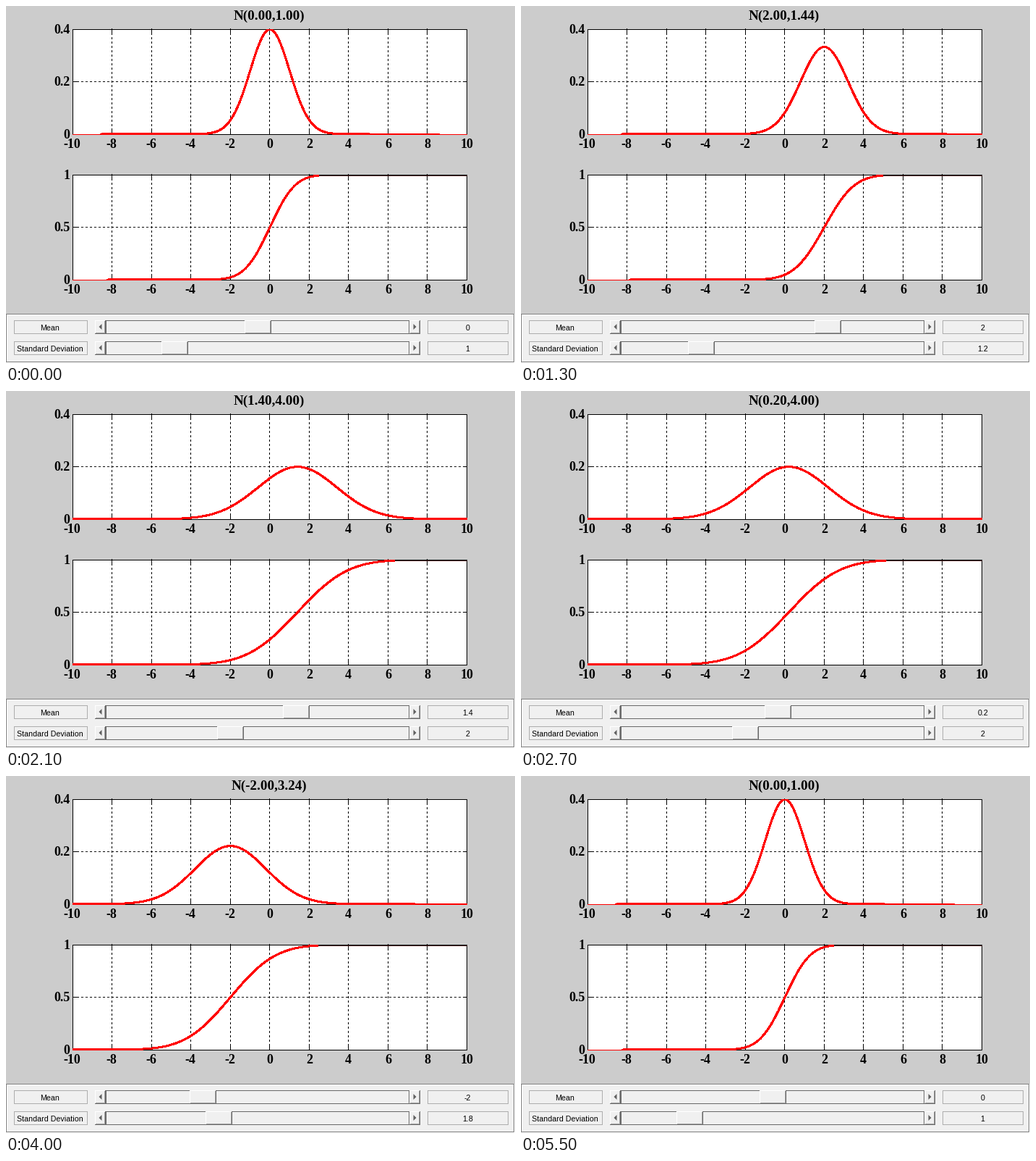
Write a matplotlib script that moves like this. It is 704x493 px and loops after 5.6 s.

```python
import math

import matplotlib.pyplot as plt
import numpy as np
from matplotlib.animation import FuncAnimation
from matplotlib.patches import Polygon, Rectangle
from matplotlib.transforms import Bbox

W, H, DPI = 704, 493, 64
PX = 72 / DPI  # points per pixel
LEFT, RIGHT, PLOT_H = 92, 637, 145
FRAMES = 56
FACE = "#f0f0f0"
EPS = 1.1e-16

fig = plt.figure(figsize=(W / DPI, H / DPI), dpi=DPI, facecolor="#cccccc")
ax = fig.add_axes([0, 0, 1, 1])
ax.set_xlim(0, W)
ax.set_ylim(H, 0)
ax.axis("off")


def fill(x, y, w, h, color, z=1):
    return ax.add_patch(Rectangle((x, y), w, h, fc=color, lw=0,
                                  antialiased=False, zorder=z))


def frame(x0, y0, x1, y1, color, z=1):
    """One-pixel outline through the given corner pixels."""
    for x in (x0, x1):
        fill(x, y0, 1, y1 - y0 + 1, color, z)
    for y in (y0, y1):
        fill(x0, y, x1 - x0 + 1, 1, color, z)


def serif(x, y, s, size=18, ha="center"):
    return ax.text(x, y, s, family="Liberation Serif", weight="bold",
                   size=size * PX, ha=ha, va="baseline")


def sans(x, y, s):
    return ax.text(x, y, s, family="Liberation Sans", size=10.67 * PX,
                   ha="center", va="baseline")


def plot_area(top, labels):
    bottom = top + PLOT_H
    mid = bottom - 73
    fill(LEFT, top, RIGHT - LEFT + 1, PLOT_H + 1, "white", 0)
    for k in range(11):
        x = int(LEFT + 54.5 * k)
        if 0 < k < 10:
            for y in range(bottom, top, -6):
                fill(x, y - 2, 1, 3, "black")
            fill(x, top, 1, 6, "black")
            fill(x, bottom - 5, 1, 6, "black")
        serif(x - 0.5 if k < 5 else x + 0.5, bottom + 19, str(2 * k - 10))
    for x in range(LEFT, RIGHT, 6):
        fill(x, mid, 3, 1, "black")
    for x in (LEFT, RIGHT - 5):
        fill(x, mid, 6, 1, "black")
    frame(LEFT, top, RIGHT, bottom, "black")
    for y, s in zip((bottom, mid, top), labels):
        serif(88.5, y + 6.3, s, ha="right")

    line, = ax.plot([], [], color="red", lw=2 * PX, antialiased=False, zorder=4)
    line.set_clip_box(Bbox([[LEFT, H - bottom - 1], [RIGHT + 1, H - top]]))
    return line


def raised(x, y, w, h, z=3):
    """Raised button face; returns its parts."""
    return [fill(x, y, w, h, "#696969", z),
            fill(x, y, w - 1, h - 1, "white", z),
            fill(x + 1, y + 1, w - 2, h - 2, "#a0a0a0", z),
            fill(x + 1, y + 1, w - 3, h - 3, FACE, z)]


def control(y, name):
    """Label, slider and value box; returns the thumb parts and value text."""
    for x0, x1 in ((11, 112), (583, 694)):
        frame(x0, y, x1, y + 18, "#adadad")
    sans(61, y + 14, name)
    fill(138, y, 420, 19, "#696969")
    fill(139, y + 1, 418, 17, FACE)
    for x, tip in ((123, -1), (558, 1)):
        raised(x, y, 15, 19, 2)
        cx, cy = x + 7.5, y + 9
        ax.add_patch(Polygon([(cx + 2 * tip, cy), (cx - 2 * tip, cy - 4),
                              (cx - 2 * tip, cy + 4)], fc="#606060", lw=0,
                             zorder=3))
    thumb = [(p, p.get_x()) for p in raised(0, y, 37, 19)]
    return thumb, sans(638.5, y + 14, "")


pdf_line = plot_area(32, ("0", "0.2", "0.4"))
cdf_line = plot_area(233, ("0", "0.5", "1"))
cap, = ax.plot([], [], color="#501818", lw=PX, antialiased=False, zorder=3)
title = serif(364, 19, "", 19)

fill(0, 425, W, 68, FACE, 0)
frame(1, 426, 703, 492, "white")
frame(0, 425, 702, 491, "#808080")
mean_ctl = control(434, "Mean")
std_ctl = control(463, "Standard Deviation")

xs = np.linspace(-10, 10, 401)
px = LEFT + 0.5 + 27.25 * (xs + 10)


def rows(v, bottom):
    """Row of a 0..1 height; exact zero sinks onto the axis line."""
    return np.where(v > EPS, bottom - PLOT_H * v, bottom + 1)


def set_control(ctl, frac, value):
    thumb, text = ctl
    x = int(139.75 + 381 * frac)
    for part, dx in thumb:
        part.set_x(x + dx)
    text.set_text(f"{value:g}")


def update(i):
    mean = round(float(np.interp(i, [1, 11, 18, 38, 45, 55],
                                 [0, 2, 2, -2, -2, 0])), 1) + 0.0
    std = round(float(np.interp(i, [12, 17, 39, 44], [1, 2, 2, 1])), 1)
    z = (xs - mean) / std
    pdf = np.exp(-z * z / 2) / (std * math.sqrt(2 * math.pi))
    cdf = np.array([math.erfc(-t / math.sqrt(2)) / 2 for t in z])

    pdf_line.set_data(px, rows(pdf / 0.4, 177))
    full = cdf > 1 - 1 / PLOT_H
    cdf_line.set_data(px[~full], rows(cdf[~full], 378))
    cap.set_data([px[full][0], RIGHT], [233.5, 233.5])

    title.set_text(f"N({mean:.2f},{std * std:.2f})")
    set_control(mean_ctl, (mean + 5) / 10, mean)
    set_control(std_ctl, std / 5, std)
    return []


anim = FuncAnimation(fig, update, frames=FRAMES, interval=100,
                     repeat=True, repeat_delay=0)
plt.show()
```
